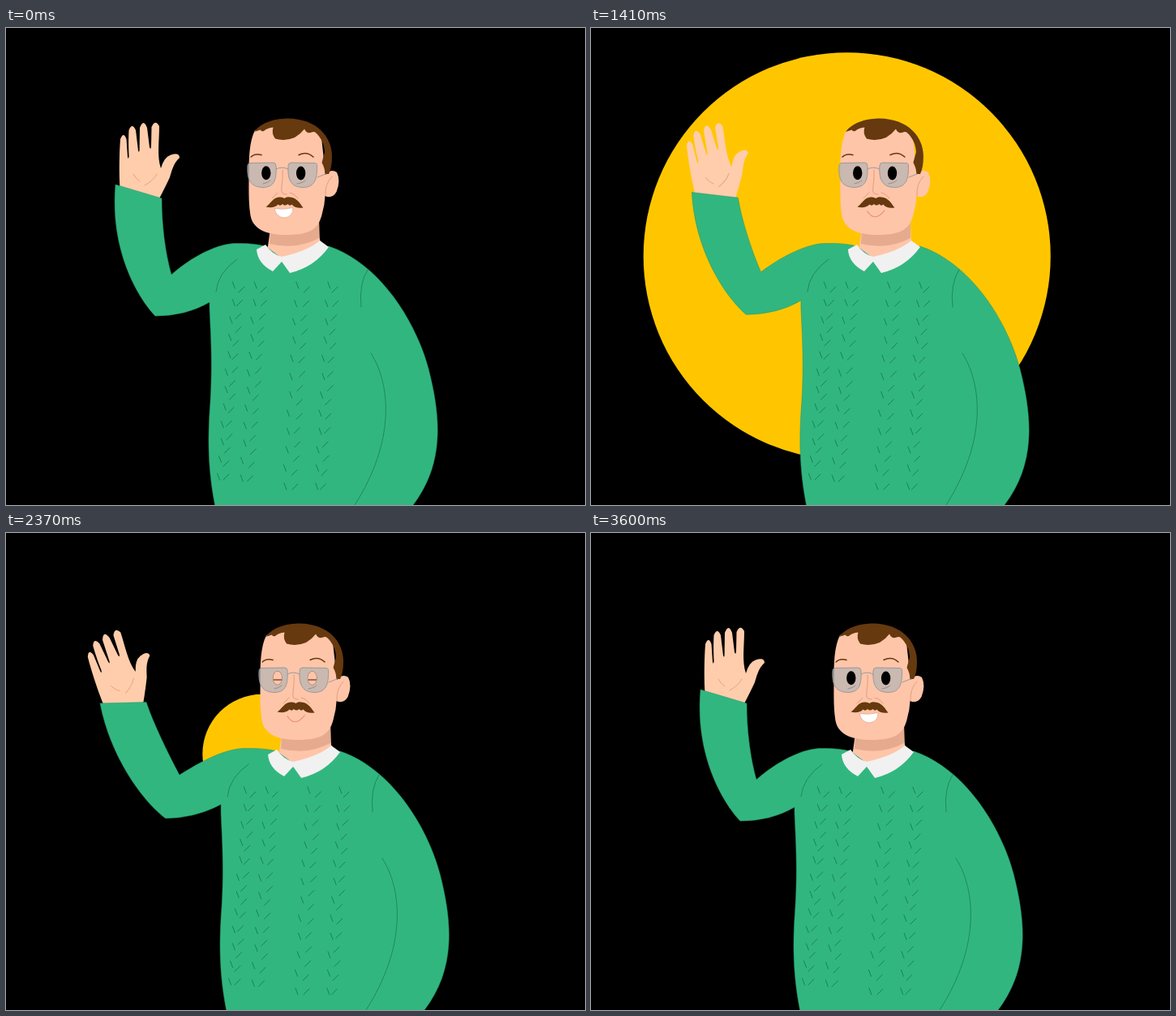
Recreate the animation shown at these times as an HTML page. Size 714 by 588 pixels, loop 3630 ms.

```html
<!DOCTYPE html>
<html lang="en">
<head>
<meta charset="utf-8">
<title>Waving man</title>
<style>
html, body { margin: 0; width: 100%; height: 100%; overflow: hidden; background: #000; }
svg { display: block; width: 714px; height: 588px; }
.line { fill: none; stroke-linecap: round; stroke-linejoin: round; }
</style>
</head>
<body>
<svg viewBox="0 0 714 588">
  <defs>
    <clipPath id="eyes">
      <ellipse cx="320.8" cy="178.7" rx="5.7" ry="8.5"/>
      <ellipse cx="363.6" cy="178.9" rx="5.7" ry="8.5"/>
    </clipPath>
  </defs>
  <rect width="714" height="588"/>
  <circle id="sun" cx="315.7" fill="#ffc600"/>
  <g id="man">
    <g id="hand">
      <path fill="#ffcdab" d="M141 202C139 180 140 150 141 137Q145 127 148.5 137L150 159Q151 163 151.6 158
        C151 145 151 135 151.5 126Q155.5 116 160 126L163 151Q164.3 155 164.6 150L165 123Q169.5 111 174 123
        L177 147Q178.5 151 179 146L179.5 122Q184 112 189 121C189 140 186 158 191 173Q195 159 203 156.500
        Q214 153 214 160C206 167 204 178 202 184Q196 197 187 214Z"/>
      <path class="line" stroke="#e3a581" d="M157 180Q160 186 165 189M186 180Q182 188 171 194"/>
    </g>

    <path fill="#ffc5a9" d="M327 240L322 276L340 288L387 268L386 235Z"/>

    <path id="sweater" fill="#32b67f" stroke="#229465" stroke-width=".5"/>
    <path id="knit" class="line" stroke="#178355" stroke-width="1"/>
    <path class="line" stroke="#1d8a5b" d="M285 285Q261 302 259 325M446 298Q435 315 438 344
      M450 401C475 440 480 510 430 588"/>

    <path fill="#ffc5a9" d="M322 269Q355 274 386 258L388 264Q372 276 340 283Z"/>
    <path fill="#e6ab8e" d="M326 250L325 266Q358 274 386 259L386 240Z"/>
    <path fill="#f1f1f1" d="M320 267L309 273Q310 290 329 300L340 288L350 302Q380 295 398 270L387 262
      Q372 275 340 282Q328 279 320 267Z"/>

    <path fill="#ffc5a9" d="M307 126C300 140 299.500 160 299.500 180C299.500 200 299 212 301 228C303 248 320 255 346 255
      C376 255 386 247 390 228Q393 218 393.5 207Q402 211 407.500 202Q413 188 408 178Q401 173 394 181L388 126L345 114Z"/>
    <path class="line" stroke="#e3a083" d="M394 207Q393 192 402 183"/>
    <path fill="#66390f" d="M306 128C316 115 334 111.500 348 111.500C383 112 402 134 402 158Q402 172 398 180
      L393.500 180Q393 172 389.500 166Q391 160 393 153Q392.500 142 386 133.500Q381 126 377 128.5Q371 131 368 124.5
      Q363 131 356 135Q344 140 332 136.500Q327 130 329.500 122.5Q322 123 318 127Q314 128 314 125.5Z"/>
    <path class="line" stroke="#66390f" stroke-width="1.5" d="M302 159Q307 154 315 156.5M361 156.5Q371 151.5 379 159"/>
    <path class="line" stroke="#e39b7b" d="M341 175C342 188 339 195 340 202Q341 205 346 205M335 203L328 210M350 203Q357 205 360 210"/>

    <path fill="#b5b5b5" fill-opacity=".72" stroke="#999" d="M298 170Q298 166 303 166.500L329 166Q333 166 333 170
      C334 190 329 196 317 196.500C302 196 297 188 298 170ZM348 170Q348 166 352 166L379 166.500Q384 166 383.500 170
      C384 189 379 196.500 366 196.500C352 196 347 188 348 170Z"/>
    <path class="line" stroke="#999" d="M333 174Q340 170 348 174M384 184L394 180"/>
    <path class="line" stroke="#9c8b82" d="M317 192Q323 191 326 188M359 192Q366 191 369 188"/>
    <g clip-path="url(#eyes)">
      <path d="M310 165H375V195H310Z"/>
      <path id="lids" fill="#ffc5a9" stroke="#775443"/>
    </g>
    <g id="lidRim" class="line" stroke="#c78f74" stroke-width=".7">
      <ellipse cx="320.8" cy="178.7" rx="5.7" ry="8.5"/>
      <ellipse cx="363.6" cy="178.9" rx="5.7" ry="8.5"/>
    </g>

    <path fill="#66390f" d="M320.500 220.500C326 217 329 209 337 208.500Q341 208 343.500 210Q346 207.500 350 208.500
      C359 209 363 217 366.500 221.500Q357 223 352.500 217.500Q350 220 347.500 217Q344 220 341 217
      Q338 220 335.500 217.500Q330 223 320.500 220.500Z"/>
    <path id="smile" class="line" stroke="#e58e70" stroke-width="1.2" d="M333 226Q342 240 354 225"/>
    <path id="teeth" fill="#fff" stroke="#d99a80" stroke-width=".6" d="M331 222.500Q342 224.500 354 221.500Q354 233 343 234Q333 233 331 222.500Z"/>
  </g>
</svg>
<script>
const LOOP = 3630, STEP = 30, SWAY = 1800;
const $ = id => document.getElementById(id);
const set = (id, attrs) => { for (const k in attrs) $(id).setAttribute(k, attrs[k]); };
const mix = (a, b, k) => a + (b - a) * k;
const clamp = v => Math.max(0, Math.min(1, v));

// Arm outline from the armpit round to the shoulder, at both ends of the wave
const armIn = [251,338, 222,355, 184,355, 161,331, 128,272, 135,193, 192,210,
  192,245, 197,280, 204,304, 230,281, 262,265, 285,265.5];
const armOut = [251,333, 220,350, 182,350.5, 147,326, 108,273, 88,217, 145,208,
  158,232, 181,268, 198,296, 222,283, 255,265, 280,265.5];
const cmds = ['L', 'Q', '', 'C', '', '', 'L', 'C', '', '', 'C', '', ''];

function sweater(k) {
  const arm = cmds.map((c, i) => {
    const at = j => mix(armIn[j], armOut[j], k).toFixed(2);
    return c + at(2 * i) + ' ' + at(2 * i + 1);
  }).join(' ');
  return 'M258 590C248 540 249 500 252 460C255 410 252 370 251 345' + arm +
    'Q305 265 320 269L340 284L398 269C458 289 504 357 521 420C537 482 540 538 502 588V590Z';
}

// Cables of two strands of stitches, drifting left as they go down
function knit() {
  let d = '';
  for (const [left, right, lean, bottom] of [[282, 290, 19, 553], [308, 319, 17, 555], [359, 371, 15, 565], [398, 407, 15, 565]]) {
    const strand = (x, top, n, dash) => {
      for (let i = 0; i < n; i++) {
        const f = i / (n - 1);
        d += `M${x - lean * f + Math.sin(i * 2.3 + x)} ${mix(top, bottom, f)}` + dash;
      }
    };
    strand(left, 317, 12, 'm-2 -4l3 8');
    strand(right, 322, 15, 'm-4 4l7 -7');
  }
  return d;
}

// Straight at the peak, easing away to nothing at both ends
function sunRadius(t) {
  const u = Math.min(1, Math.abs(t - 1500) / 1500);
  return 273.5 * Math.pow(1 - u, 1.36 + (t < 1500 ? .4 : .27) * u);
}

// 1 is shut
const blink = (t, mid) => clamp((150 - Math.abs(t - mid)) / 105);

function draw(t) {
  const k = (1 - Math.cos(2 * Math.PI * t / SWAY)) / 2;
  const r = sunRadius(t);
  set('sun', { r, cy: 268.5 + .051 * r });
  set('man', { transform: `translate(${20 * k} 0)` });
  set('sweater', { d: sweater(k) });
  set('hand', { transform: `translate(${-49.5 * k} ${7.5 * k}) rotate(${-26.5 * k} 163.5 201.5)` });

  const shut = Math.max(blink(t, 1008), blink(t, 2370));
  const top = mix(168, 181, shut), low = mix(190, 181, shut);
  set('lids', { d: `M305 160H380V${top}H305ZM305 ${low}H380V200H305Z` });
  set('lidRim', { opacity: shut > 0 ? 1 : 0 });

  const talk = Math.max(clamp((660 - t) / 120), clamp((t - 2700) / 120));
  set('teeth', { opacity: talk > 0 ? 1 : 0, transform: `translate(0 ${223 * (1 - talk)}) scale(1 ${talk})` });
  set('smile', { opacity: talk < 1 ? 1 : 0 });
}

set('knit', { d: knit() });
const start = performance.now();
function tick() {
  const t = (performance.now() - start) % LOOP;
  draw(Math.floor(t / STEP) * STEP);
  requestAnimationFrame(tick);
}
draw(0);
requestAnimationFrame(tick);
</script>
</body>
</html>
```
